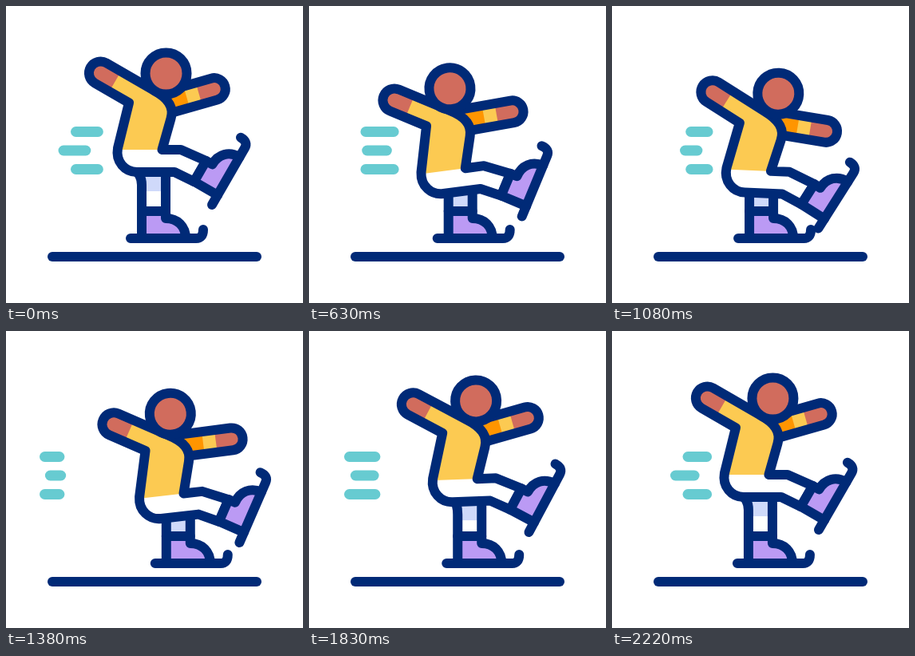
Animation, 372 px wide and 372 px high, one loop 2250 ms. Source, as an HTML page:

```html
<!DOCTYPE html>
<html lang="en">
<head>
<meta charset="utf-8">
<title>Figure skater</title>
<style>
  html, body { margin: 0; height: 100%; overflow: hidden; background: #fff; }
  svg { display: block; width: 100vw; height: 100vh; }
  .ink { fill: none; stroke: #002a77; stroke-width: 12; stroke-linecap: round; stroke-linejoin: round; }
  .wind { stroke: #67cbd1; stroke-width: 13; stroke-linecap: round; }
  .skin { fill: #d16c5d; }
  .shirt { fill: #fcca52; }
  .sleeve { fill: #ff9500; }
  .white { fill: #fff; }
  .shade { fill: #cfd9fa; }
  .boot { fill: #bb9af4; }
</style>
</head>
<body>
<svg viewBox="0 0 372 372">
  <defs>
    <path id="shape" d="M125.7 71.4 L185 105.6 C202 115 211 126 206.5 141 L195.5 180 H219 L250.6 194 L235.6 220 L211 208 H164 C149 208 137 195 140 178 L154 121.3 L111.2 96.6 A14.5 14.5 0 0 1 125.7 71.4 Z"/>
    <clipPath id="inside"><use href="#shape"/></clipPath>
    <path id="limb" d="M-5 -14 H58 A14 14 0 0 1 58 14 H-5"/>
    <clipPath id="inLimb"><use href="#limb"/></clipPath>
    <g id="skate">
      <path class="boot" d="M14 0 V-34 H44 V-25 C59 -25 69 -15 69 0 Z"/>
      <path class="ink" d="M14 0 V-34 H44 V-25 C59 -25 69 -15 69 0"/>
      <path class="ink" d="M0 0 H82 Q91 0 91 -11"/>
    </g>
  </defs>

  <path class="ink" d="M58 314 H314"/>
  <g id="winds">
    <line class="wind" y1="157.5" y2="157.5"/>
    <line class="wind" y1="181" y2="181"/>
    <line class="wind" y1="204.5" y2="204.5"/>
  </g>

  <g id="skater">
    <rect id="sock" class="white" x="170" width="30"/>
    <rect id="calf" class="shade" x="170" width="30"/>
    <path id="shin" class="ink"/>
    <use href="#skate" x="156" y="291"/>

    <g id="body">
      <g id="arm">
        <g clip-path="url(#inLimb)">
          <rect class="skin" x="37" y="-16" width="40" height="32"/>
          <rect class="shirt" x="21" y="-16" width="17" height="32"/>
          <rect class="sleeve" x="-8" y="-16" width="30" height="32"/>
        </g>
        <use href="#limb" class="ink"/>
      </g>
      <g clip-path="url(#inside)">
        <rect class="white" x="90" y="60" width="180" height="180"/>
        <rect class="shirt" x="90" y="60" width="130" height="120"/>
        <rect class="skin" x="-30" y="-20" width="51" height="40" transform="translate(118.5 84) rotate(30)"/>
      </g>
      <use href="#shape" class="ink"/>
      <use href="#skate" transform="translate(258 249) rotate(-60)"/>
      <g id="head">
        <circle class="skin" cx="200.5" cy="84.5" r="24"/>
        <circle class="ink" cx="200.5" cy="84.5" r="26"/>
      </g>
    </g>
  </g>
</svg>
<script>
const LOOP = 2250, GLIDE = LOOP / 4;
const $ = id => document.getElementById(id);
const set = (el, attrs) => { for (const k in attrs) el.setAttribute(k, attrs[k]); };
const clamp = v => Math.min(1, Math.max(0, v));
const smooth = v => { v = clamp(v); return v * v * (3 - 2 * v); };

// time, crouch, lean, head shift x, head shift y, arm swing
const POSES = [
  [0, 0, 0, 0, 0, 0],
  [330, 17.3, -4, -1.6, -3.3, 3.3],
  [610, 26.4, -7.5, -12, -4.6, 12.7],
  [1095, 25.8, 2.4, 0.5, -2, 23],
  [1450, 26.4, -7.5, -12, -4.6, 12.7],
  [1650, 17.5, -5.4, -9, -4.6, 6.3],
  [1990, 0, 0, 0, 0, 0],
  [LOOP, 0, 0, 0, 0, 0]
];

// start, reach of the middle line
const GUSTS = [[-242, 1], [320, 0.7], [883, 0.72], [1398, 0.7], [2008, 1]];

const slope = (i, c) => (POSES[i + 1][c] - POSES[i][c]) / (POSES[i + 1][0] - POSES[i][0]);

// Eased tangent: flat at turning points and at both ends
function tangent(i, c) {
  if (i === 0 || i === POSES.length - 1) return 0;
  const a = slope(i - 1, c), b = slope(i, c);
  return a * b > 0 ? 2 * a * b / (a + b) : 0;
}

function poseAt(t) {
  let i = 0;
  while (t >= POSES[i + 1][0]) i++;
  const span = POSES[i + 1][0] - POSES[i][0], u = (t - POSES[i][0]) / span;
  const mix = smooth(u), w = 1 - u;
  return [1, 2, 3, 4, 5].map(c =>
    POSES[i][c] * (1 - mix) + POSES[i + 1][c] * mix +
    span * u * w * (w * tangent(i, c) - u * tangent(i + 1, c)));
}

function drawBody(t) {
  const [crouch, lean, hx, hy, swing] = poseAt(t);
  const phase = t / GLIDE % 1;
  const x = 31.5 * smooth(1 - Math.abs(2 * phase - 1));
  set($('skater'), { transform: `translate(${x} 0)` });
  set($('body'), { transform: `translate(${0.3 * lean} ${crouch}) rotate(${lean} 170 195)` });
  set($('arm'), { transform: `translate(205 120) rotate(${swing - 15.9})` });
  // Head shift is measured upright, so undo the lean
  set($('head'), { transform: `rotate(${-lean}) translate(${hx} ${hy}) rotate(${lean})` });

  // The thigh straightens as the body sinks
  const top = 205 + crouch, hem = Math.min(257, 232 + 0.85 * crouch);
  const flare = Math.max(0, 12 - crouch);
  set($('sock'), { y: top, height: 257 - top });
  set($('calf'), { y: top, height: hem - top });
  set($('shin'), { d: `M${170 - flare} ${top - 2} Q170 ${top + 5} 170 ${top + 19} V257 M200 ${top + 4} V257` });
}

function drawWind(t) {
  const [begin, middle] = GUSTS.findLast(g => t >= g[0]);
  const u = (t - begin) / GLIDE % 1;
  const trail = 80 * u ** 2.15, lead = Math.max(80 * smooth(u / 0.85), trail + 0.01);
  [...$('winds').children].forEach((line, i) => {
    const [from, reach] = i === 1 ? [113, middle] : [128.5, 1];
    set(line, { x1: from - reach * lead, x2: from - reach * trail });
  });
}

const start = performance.now();
function frame() {
  const t = (performance.now() - start) % LOOP;
  drawBody(t);
  drawWind(t);
  requestAnimationFrame(frame);
}
frame();
</script>
</body>
</html>
```
